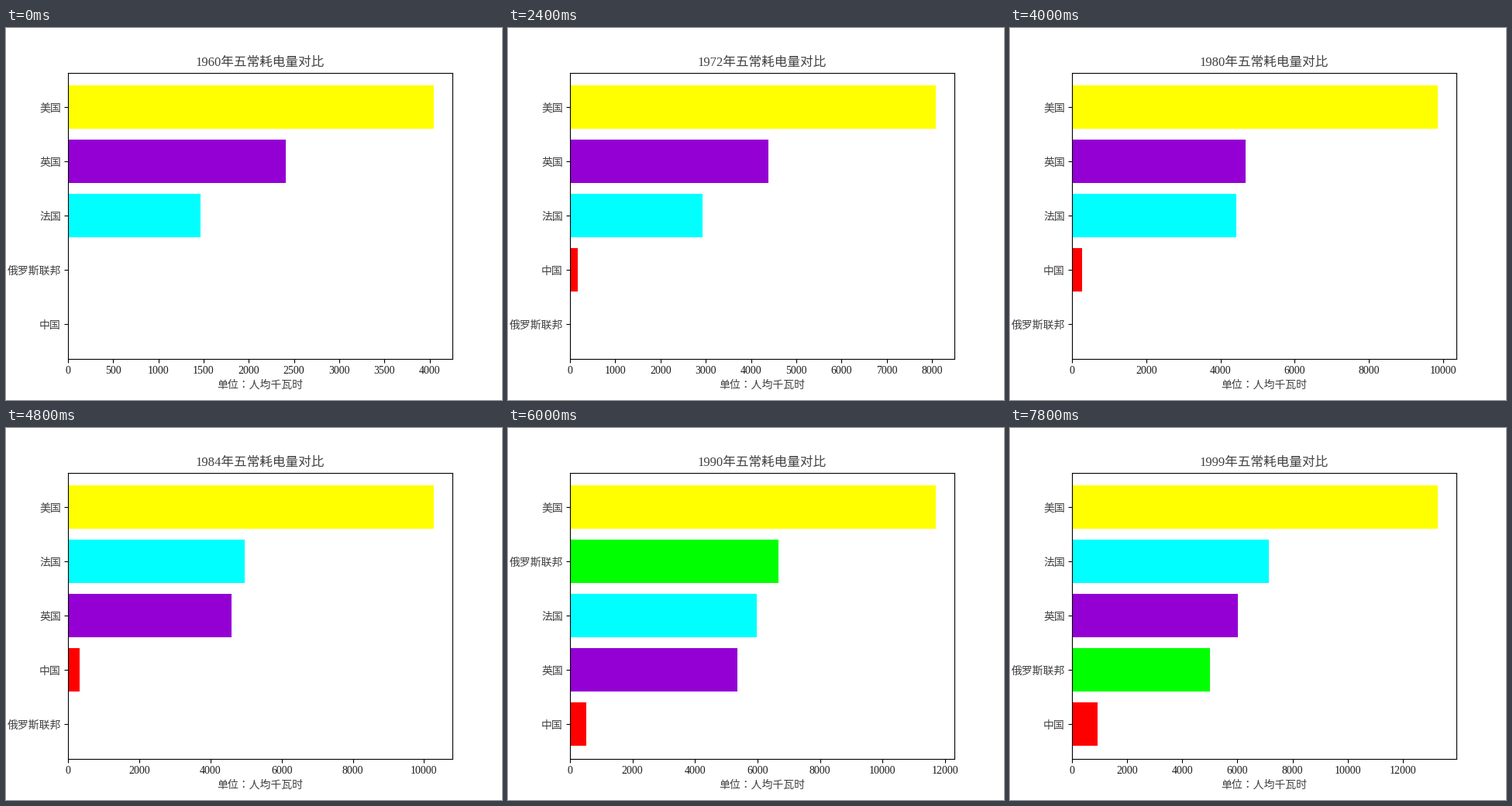
These frames come from a looping animation (640 px wide and 480 px high, 8000 ms). A matplotlib script:

```python
import numpy as np
import matplotlib.pyplot as plt
from matplotlib.animation import FuncAnimation

INK = "0.25"
plt.rcParams["font.family"] = ["Liberation Serif", "Noto Sans CJK JP"]
plt.rcParams["text.color"] = INK
plt.rcParams["xtick.labelcolor"] = "0.1"
plt.rcParams["xtick.major.pad"] = 3

START, COUNT = 1960, 40

# Turning points of kWh per person; straight lines between, nothing before
COUNTRIES = [
    ("中国", "red", {1971: 152, 1980: 278, 1984: 332, 1990: 513,
                   1996: 825, 1999: 918}),
    ("俄罗斯联邦", "lime", {1990: 6672, 1992: 6140, 1994: 5270,
                       1998: 4900, 1999: 5006}),
    ("法国", "cyan", {1960: 1466, 1966: 2103, 1972: 2936, 1980: 4426,
                    1984: 4952, 1990: 5980, 1991: 6373, 1999: 7143}),
    ("英国", "darkviolet", {1960: 2411, 1966: 3424, 1972: 4383, 1979: 4997,
                          1980: 4680, 1982: 4496, 1984: 4596, 1990: 5357,
                          1999: 6018}),
    ("美国", "yellow", {1960: 4050, 1964: 4966, 1966: 5597, 1969: 6870,
                      1971: 7517, 1972: 8087, 1973: 8535, 1975: 8400,
                      1978: 9558, 1980: 9865, 1982: 9540, 1984: 10282,
                      1986: 10430, 1989: 11538, 1999: 13282}),
]

fig, ax = plt.subplots(figsize=(6.4, 4.8), dpi=100)
fig.text(0.5125, 15 / 480, "单位：人均千瓦时", ha="center", va="baseline")


def usage(points, year):
    return np.interp(year, list(points), list(points.values()), left=0)


def draw(i):
    year = START + i
    ranked = sorted((usage(points, year), k)
                    for k, (_, _, points) in enumerate(COUNTRIES))
    ax.clear()
    ax.barh(range(len(ranked)), [value for value, _ in ranked],
            color=[COUNTRIES[k][1] for _, k in ranked])
    ax.set_yticks(range(len(ranked)), [""] * len(ranked))
    for row, (_, k) in enumerate(ranked):
        ax.annotate(COUNTRIES[k][0], (0, row),
                    xycoords=("axes fraction", "data"),
                    xytext=(-6.6, -4.3), textcoords="offset points",
                    ha="right", va="baseline", annotation_clip=False)
    ax.set_title(f"{year}年五常耗电量对比")


anim = FuncAnimation(fig, draw, frames=COUNT, init_func=lambda: None,
                     interval=200, repeat=True)
plt.show()
```
